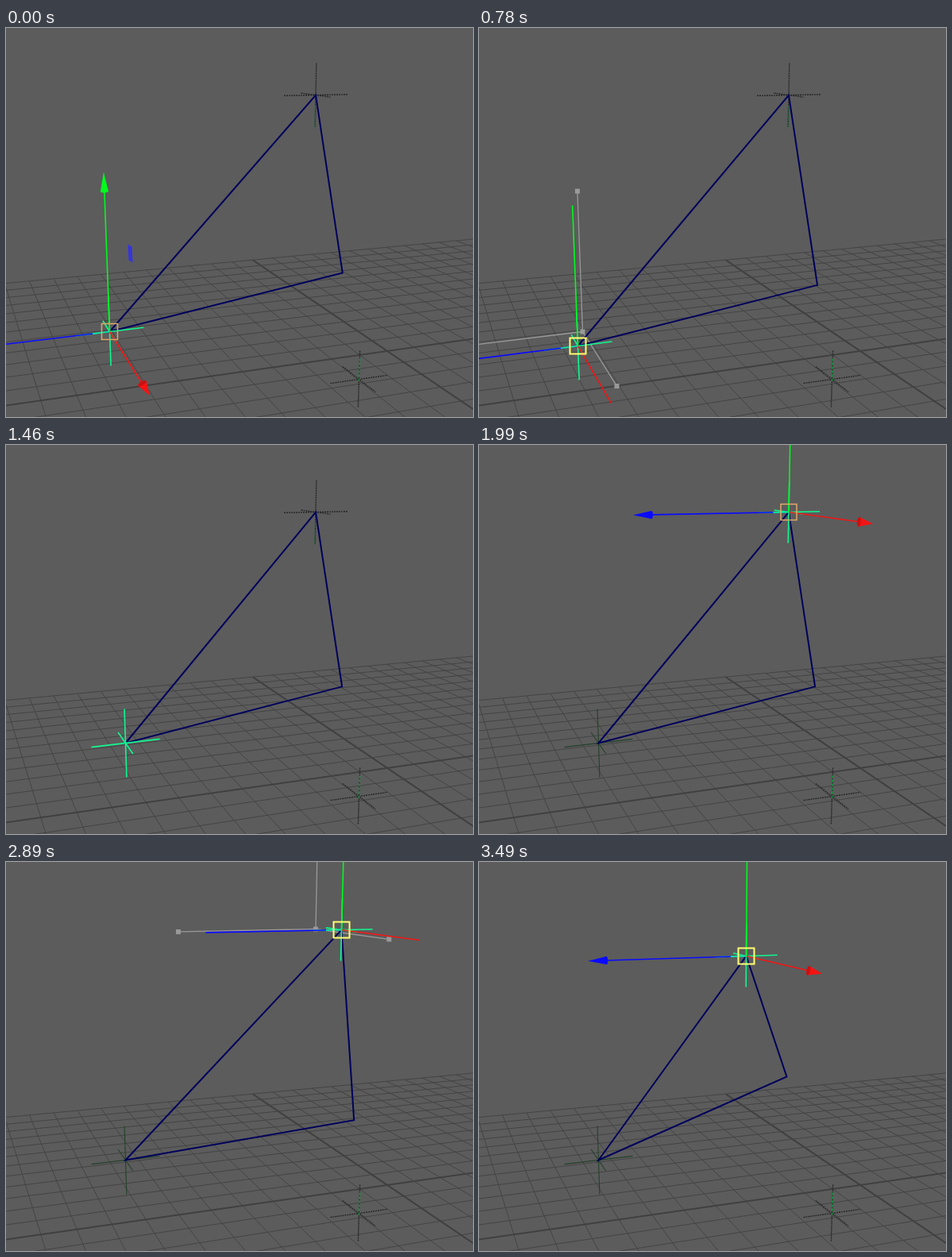
An HTML page with a canvas for the animation above (3.55 s loop, 588 by 490 pixels).

```html
<!DOCTYPE html>
<html>
<head>
<meta charset="utf-8">
<style>
html, body { margin: 0; width: 100%; height: 100%; overflow: hidden; background: #5c5c5c; }
canvas { display: block; }
</style>
</head>
<body>
<canvas id="stage" width="588" height="490"></canvas>
<script>
const ctx = document.getElementById('stage').getContext('2d');
ctx.translate(0.5, 0.5); // whole coordinates are pixel centres
const LOOP = 3550;
const GREEN = '#00fa1e', BLUE = '#0a0aff', RED = '#f41414', PICKED = '#10f890', GHOST = '#999';
const TAN = '#e0a868', YELLOW = '#ffff70';

// Each key: time, x, y
const lowPath = [[0, 130, 382], [240, 120, 308], [480, 114, 245], [540, 115, 268], [780, 124, 400],
  [900, 131, 434], [1080, 150, 402], [1140, 158, 377], [1200, 153, 376], [1260, 150, 375]];
const highPath = [[2170, 389.5, 84], [2410, 256, 140], [2530, 212, 162], [2710, 280, 131], [2890, 422, 85],
  [3070, 486, 70], [3250, 435, 83], [3490, 336, 118]];

// Smooth curve through the keys, held at both ends
function follow(keys, t) {
  const last = keys.length - 1;
  if (t <= keys[0][0]) return keys[0].slice(1);
  if (t >= keys[last][0]) return keys[last].slice(1);
  const k = keys.findIndex(key => key[0] > t) - 1;
  const a = keys[k], b = keys[k + 1], span = b[0] - a[0], s = (t - a[0]) / span;
  const slope = (n, c) => {
    if (n === 0 || n === last) return 0;
    const p = keys[n - 1], q = keys[n], r = keys[n + 1];
    const before = (q[c] - p[c]) / (q[0] - p[0]), after = (r[c] - q[c]) / (r[0] - q[0]);
    return before * after > 0 ? 2 * before * after / (before + after) : 0;
  };
  return [1, 2].map(c => {
    const h = s * s * (3 - 2 * s);
    return a[c] + (b[c] - a[c]) * h
      + span * s * (1 - s) * ((1 - s) * slope(k, c) - s * slope(k + 1, c));
  });
}

function line(x1, y1, x2, y2, color, width = 1, dash = []) {
  ctx.strokeStyle = color;
  ctx.lineWidth = width;
  ctx.setLineDash(dash);
  ctx.beginPath();
  ctx.moveTo(x1, y1);
  ctx.lineTo(x2, y2);
  ctx.stroke();
}

function polygon(points, fill, stroke) {
  ctx.beginPath();
  points.forEach(p => ctx.lineTo(...p));
  ctx.closePath();
  if (fill) { ctx.fillStyle = fill; ctx.fill(); }
  if (stroke) { ctx.strokeStyle = stroke; ctx.lineWidth = 2; ctx.setLineDash([]); ctx.stroke(); }
}

// Floor grid in perspective, from two vanishing points
function floorPoint(i, j) {
  const u = i * 0.01264, v = j * 0.0348, w = 1 + u + v;
  return [(479.5 + 3180 * u - 96 * v) / w, (406.4 + 20 * u + 17 * v) / w];
}

function drawFloor() {
  for (let n = -12; n <= 12; n++) {
    const color = n ? '#444' : '#404040', width = n ? 1 : 2;
    line(...floorPoint(-12, n), ...floorPoint(12, n), color, width);
    line(...floorPoint(n, -12), ...floorPoint(n, 12), color, width);
  }
}

// Screen directions of the three world axes at a point
function axes([x, y]) {
  const tilt = (x - 300) * 0.00022, fall = 0.02 + (y - 85) * 0.00034;
  const up = 177 + Math.max(0, 377 - y) * 0.05, side = 173 + (390 - x) * 0.06;
  return {
    tilt, fall,
    up: [tilt * up, -up],
    left: [-side, fall * side],
    near: [43 + 0.19 * (x - 130), 13 + 0.187 * (y - 85)]
  };
}

function drawLocator(p, arm, color, width, dash) {
  const [x, y] = p, { tilt, fall, near } = axes(p);
  const [dx, dy] = near.map(d => d * 0.2);
  line(x - arm, y + fall * arm, x + arm, y - fall * arm, color, width, dash);
  line(x + tilt * arm, y - arm, x - tilt * arm, y + arm, color, width, dash);
  line(x - dx, y - dy, x + dx, y + dy, color, width, dash);
}

function drawCone([x, y], [dx, dy], back, length, half, color, shade = color) {
  const size = Math.hypot(dx, dy), ux = dx / size, uy = dy / size;
  const bx = x + dx - ux * back, by = y + dy - uy * back;
  polygon([[bx - uy * half, by + ux * half], [bx + uy * half, by - ux * half],
    [bx + ux * length, by + uy * length]], color);
  ctx.fillStyle = shade;
  ctx.beginPath();
  ctx.ellipse(bx, by, half * 0.4, half, Math.atan2(uy, ux), 0, 7);
  ctx.fill();
}

function drawAxes(p, colors, width) {
  const a = axes(p), [x, y] = p;
  [a.left, a.near, a.up].forEach(([dx, dy], n) => line(x, y, x + dx, y + dy, colors[n], width));
  return a;
}

function drawGhost(p) {
  const [x, y] = p, a = drawAxes(p, [GHOST, GHOST, GHOST], 1.3);
  ctx.fillStyle = GHOST;
  [[0, 0], a.left, a.near, a.up].forEach(([dx, dy]) => ctx.fillRect(x + dx - 3, y + dy - 3, 6, 6));
}

function drawMover(p, arm, cones, boxColor) {
  const [x, y] = p;
  drawLocator(p, arm, PICKED, 1.6);
  const a = drawAxes(p, [BLUE, RED, GREEN], 1.6);
  // The picked locator stays visible over the inner half of the left axis
  line(x, y, x - arm / 2, y + a.fall * arm / 2, PICKED, 1.6);
  if (cones) {
    drawCone(p, a.left, 0, 23, 5, BLUE);
    drawCone(p, a.near, 4, 18, 6, RED, '#cc1010');
    drawCone(p, a.up, 0, 24, 5, GREEN);
  }
  ctx.strokeStyle = boxColor;
  ctx.lineWidth = boxColor === YELLOW ? 2 : 1.5;
  ctx.strokeRect(x - 10, y - 10, 20, 20);
}

// Third corner: below the upper point, at the height of the lower one
function corner(low, high, t) {
  if (t < 2230) {
    const level = low[1] + axes(low).fall * low[0];
    const y = 307 - 0.85 * (396.5 - level);
    return [390 + 0.149 * (y - 85), y];
  }
  const d = high[0] - 256;
  const rise = 0.275 + 0.002648 * (d - 80) - 0.0000148 * (d - 80) * (d - 134);
  return [high[0] + 67 - 0.1 * d - 0.00126 * d * d, 248 + d * Math.max(0, rise)];
}

function draw(now) {
  let t = now % LOOP;
  if (t < 1260) t -= t % 60;
  else if (t >= 2230) t -= (t - 2230) % 60;
  const low = follow(lowPath, t), high = follow(highPath, t);

  ctx.fillStyle = '#5c5c5c';
  ctx.fillRect(-1, -1, 590, 492);
  drawFloor();

  drawLocator([444, 442], 36, '#262626', 1.4, [2, 1]);
  line(445, 416, 444, 444, '#10a040', 1.5, [3, 2]);
  if (t < 1750) {
    drawLocator(high, 40, '#262626', 1.4, [2, 1]);
    line(389, 98, 388.5, 124, '#107038', 1.2, [2, 2]);
  }
  if (t >= 1690) drawLocator(low, 43, '#24402a', 1.1);

  if (t >= 60 && t < 1260) drawGhost([130, 382]);
  if (t >= 2230 && t < 3490) drawGhost([389.5, 84]);

  polygon([low, high, corner(low, high, t)], null, '#00005c');

  const boxColor = t < 60 || (t >= 1990 && t < 2230) ? TAN : YELLOW;
  if (t < 1460) drawMover(low, 43, t < 60 || t >= 1260, boxColor);
  else if (t < 1690) drawLocator(low, 43, PICKED, 1.6);
  if (t >= 1990) drawMover(high, 39, t < 2230 || t >= 3490, boxColor);
  else if (t >= 1750) drawLocator(high, 39, PICKED, 1.6);

  if (t < 60) polygon([[153, 272], [158, 275], [159, 295], [154, 292]], '#3434e0');
}

const start = performance.now();
function tick() {
  draw(performance.now() - start);
  requestAnimationFrame(tick);
}
tick();
</script>
</body>
</html>
```
